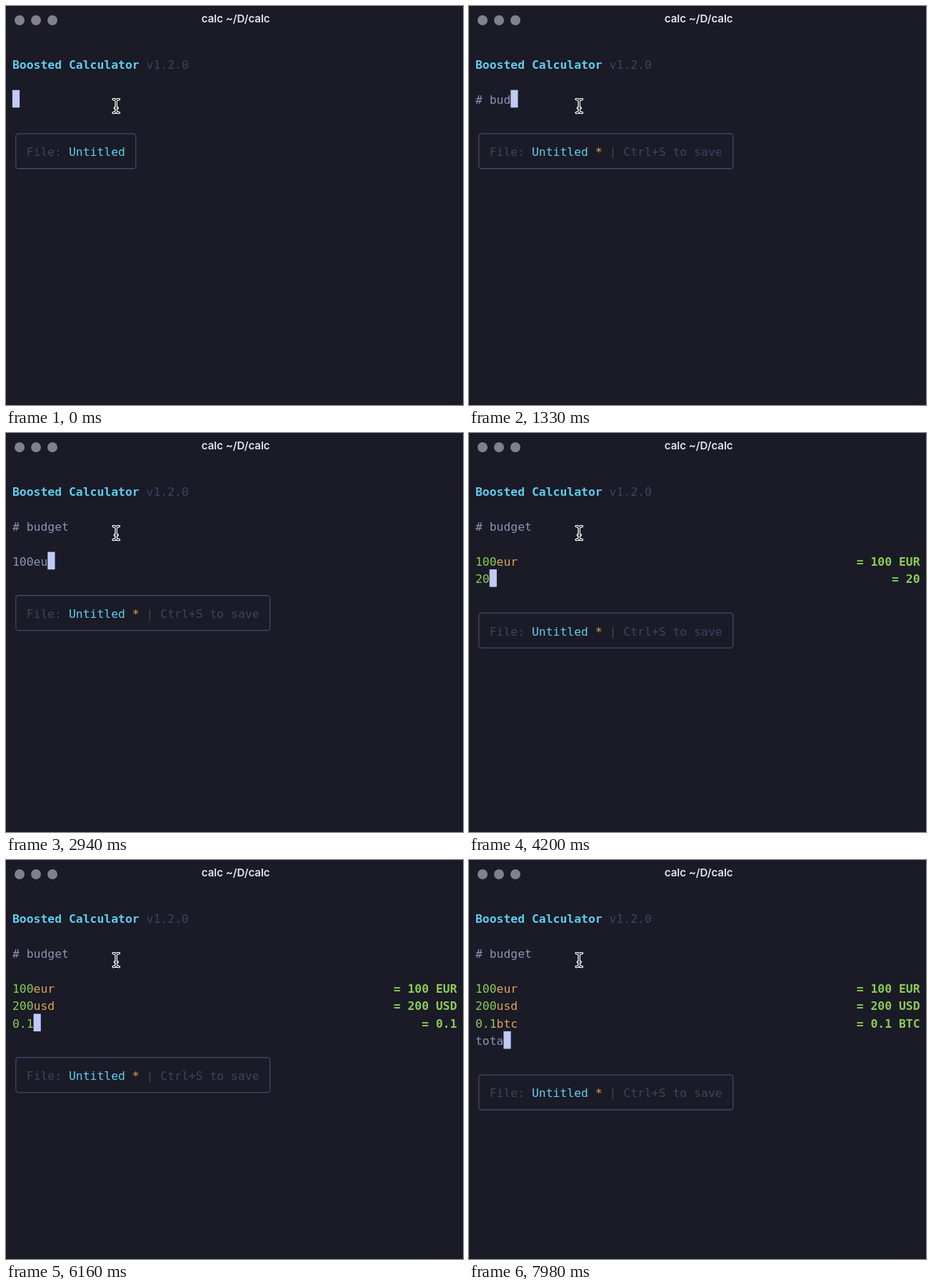
An HTML page for the animation above (8 s loop, 640 px wide and 559 px high).

```html
<!DOCTYPE html>
<html lang="en">
<head>
<meta charset="utf-8">
<title>calc</title>
<style>
  html, body { margin: 0; width: 100%; height: 100%; overflow: hidden; background: #1a1b26; }
  svg { display: block; width: 640px; height: 559px; }
  text { font: 16.42px "DejaVu Sans Mono", monospace; white-space: pre; }
  .bold { font-weight: bold; }
  .cyan { fill: #5fcdf0; }
  .dim { fill: #3e4360; }
  .plain { fill: #8b92b4; }
  .green { fill: #8dcc55; }
  .orange { fill: #dfa656; }
  .title { font: 600 15px Inter, sans-serif; fill: #e4e4e7; }
</style>
</head>
<body>
<svg viewBox="0 0 640 559">
  <rect width="640" height="559" fill="#1a1b26"/>
  <g fill="#828189">
    <circle cx="19" cy="20" r="7"/><circle cx="42" cy="20" r="7"/><circle cx="65" cy="20" r="7"/>
  </g>
  <text class="title" x="321.7" y="22.5" text-anchor="middle">calc ~/D/calc</text>
  <g id="screen"></g>
  <g id="footer">
    <rect id="frame" x="13.8" height="48.9" rx="3.5" fill="none" stroke="#414868" stroke-width="1.3"/>
    <text id="status"></text>
  </g>
  <rect id="caret" width="10.2" height="24.6" fill="#c0caf5"/>
  <g fill="none" stroke-linecap="round">
    <path id="beam" stroke="#fff" stroke-width="3.4"
      d="M150.2 130.6q3.8 0 4.1 2.8q.3-2.8 4.1-2.8M154.3 133.4v13.4M150.2 149.6q3.8 0 4.1-2.8q.3 2.8 4.1 2.8M152.4 143h3.8"/>
    <use href="#beam" id="core"/>
    <path stroke="#17181f" stroke-width="1.2"
      d="M150.2 130.6q3.8 0 4.1 2.8q.3-2.8 4.1-2.8M154.3 133.4v13.4M150.2 149.6q3.8 0 4.1-2.8q.3 2.8 4.1 2.8M152.4 143h3.8"/>
  </g>
</svg>
<script>
const LOOP = 8000, LEFT = 8.9, TOP = 117.7, CELL = 9.885, ROW = 24.45, BASE = 19.1, COLS = 63;

// [time in ms, typed key]
const keys = [
  [140, '#'], [770, ' '], [980, 'b'], [1120, 'u'], [1260, 'd'], [1540, 'g'], [1680, 'e'], [1890, 't'],
  [2100, '\n'], [2240, '\n'],
  [2380, '1'], [2520, '0'], [2660, '0'], [2800, 'e'], [2940, 'u'], [3220, 'r'], [3780, '\n'],
  [4060, '2'], [4200, '0'], [4340, '0'], [4690, 'u'], [4830, 's'], [4900, 'd'], [5180, '\n'],
  [5530, '0'], [5950, '.'], [6090, '1'], [6300, 'b'], [6720, 't'], [6930, 'c'], [7210, '\n'],
  [7420, 't'], [7630, 'o'], [7770, 't'], [7980, 'a']
];

const $ = id => document.getElementById(id);
const colX = col => LEFT + col * CELL;
const rowY = row => TOP + row * ROW;
const set = (el, attrs) => Object.entries(attrs).forEach(([k, v]) => el.setAttribute(k, v));
const span = (cls, str) => `<tspan class="${cls}">${str}</tspan>`;
const text = (col, row, spans) => `<text x="${colX(col)}" y="${rowY(row) + BASE}">${spans}</text>`;

const header = text(0, -2, span('cyan bold', 'Boosted Calculator') + span('dim', ' v1.2.0'));

function lineMarkup(line, row) {
  const sum = line.match(/^([\d.]+)(eur|usd|btc)?$/);
  if (!sum) return text(0, row, span('plain', line));
  const [, amount, unit = ''] = sum;
  const result = `= ${Number(amount)} ${unit.toUpperCase()}`.trim();
  return text(0, row, span('green', amount) + span('orange', unit)) +
    text(COLS - result.length, row, span('green bold', result));
}

function draw(typed) {
  const lines = typed.split('\n'), last = lines.length - 1;
  $('screen').innerHTML = header + lines.map(lineMarkup).join('');
  set($('caret'), { x: colX(lines[last].length), y: rowY(last) });
  set($('frame'), { y: rowY(last + 2) + ROW / 2, width: (typed ? 36 : 17) * CELL });
  set($('status'), { x: colX(2), y: rowY(last + 3) + BASE });
  $('status').innerHTML = span('dim', 'File: ') + span('cyan', 'Untitled') +
    (typed ? span('orange', ' *') + span('dim', ' | Ctrl+S to save') : '');
}

let shown = null;
const start = performance.now();
function tick() {
  const time = (performance.now() - start) % LOOP;
  const typed = keys.filter(([at]) => at <= time).map(([, key]) => key).join('');
  if (typed !== shown) draw(shown = typed);
  requestAnimationFrame(tick);
}
tick();
</script>
</body>
</html>
```
